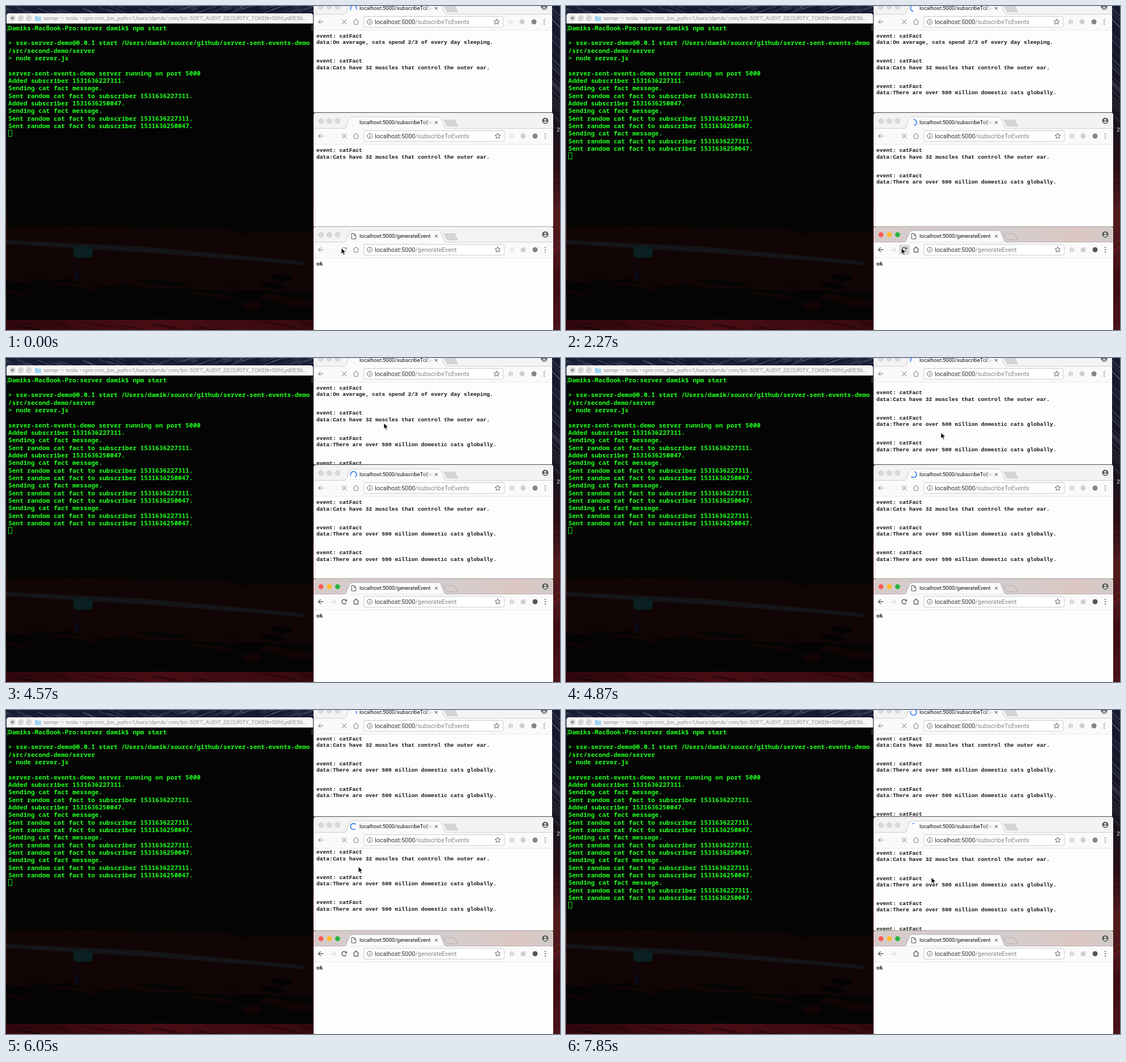
Animation, 978 px wide and 573 px high, one loop 8000 ms. Source, as an HTML page with a canvas:

```html
<!DOCTYPE html>
<html lang="en">
<head>
<meta charset="utf-8">
<title>Server-sent events demo</title>
<style>
  html, body { margin: 0; width: 100%; height: 100%; overflow: hidden; background: #111; }
  canvas { display: block; }
</style>
</head>
<body>
<canvas id="stage" width="978" height="573"></canvas>
<script>
const c = document.getElementById('stage').getContext('2d');
const LOOP = 8000;
const MONO = '600 11.1px "Noto Sans Mono", monospace';
const COURIER = 'bold 9.63px "Liberation Mono", monospace';
const ui = size => `${size}px Roboto, sans-serif`;

const bursts = [[150, 1040, 5], [1210, 2130, 7], [2270, 3180, 7], [3330, 4270, 7],
  [4420, 5460, 8], [5610, 6640, 8], [6820, 7850, 8]];
const ticks = [0, ...bursts.flatMap(([from, to, n]) =>
  Array.from({ length: n }, (_, i) => Math.round(from + (to - from) * i / (n - 1))))];

const ACTIVATED = 300;
const sends = [590, 2720, 7250];
const reloadHidden = [[590, 1210], [2720, 3020], [7250, LOOP]];
const mouse = [[0, 592, 428], [3250, 592, 428], [4270, 659, 150], [4570, 667, 115],
  [4720, 667, 115], [5310, 634, 225], [5460, 632, 233], [5720, 622, 277], [6100, 622, 277],
  [6640, 598, 399], [6850, 598, 430], [7260, 598, 430], [7850, 645, 296]];
const topScroll = [[0, 0], [4570, 0], [5000, 46.8]];
const middleScroll = [[0, 0], [5500, 0], [5800, 4], [6300, 4], [6500, 2.3]];

const globalFact = 'There are over 500 million domestic cats globally.';
const facts = ['On average, cats spend 2/3 of every day sleeping.',
  'Cats have 32 muscles that control the outer ear.', globalFact, globalFact, globalFact];
const subscribers = ['1531636227311', '1531636250047'];
const sentTo = id => `Sent random cat fact to subscriber ${id}.`;
const SENDING = 'Sending cat fact message.';
const sendLog = [SENDING, ...subscribers.map(sentTo)];
const startLog = [
  'Damiks-MacBook-Pro:server damik$ npm start', '',
  '> sse-server-demo@0.0.1 start /Users/damik/source/github/server-sent-events-demo',
  '/src/second-demo/server', '> node server.js', '',
  'server-sent-events-demo server running on port 5000',
  `Added subscriber ${subscribers[0]}.`, SENDING, sentTo(subscribers[0]),
  `Added subscriber ${subscribers[1]}.`, ...sendLog];

const smooth = p => p * p * (3 - 2 * p);

function track(keys, t) {
  const i = keys.findIndex(k => k[0] > t);
  if (i < 0) return keys[keys.length - 1].slice(1);
  const a = keys[i - 1], b = keys[i];
  const p = smooth((t - a[0]) / (b[0] - a[0]));
  return a.slice(1).map((v, j) => v + (b[j + 1] - v) * p);
}

function seeded(seed) {
  return () => (seed = seed * 16807 % 2147483647) / 2147483647;
}

function rect(x, y, w, h, fill) {
  c.fillStyle = fill;
  c.fillRect(x, y, w, h);
}

function text(string, x, y, font, fill) {
  c.font = font;
  c.fillStyle = fill;
  c.fillText(string, x, y);
}

function trace(points, { fill, stroke, width = 1, close = !!fill }) {
  c.beginPath();
  points.forEach(([x, y]) => c.lineTo(x, y));
  if (close) c.closePath();
  if (fill) { c.fillStyle = fill; c.fill(); }
  if (stroke) { c.strokeStyle = stroke; c.lineWidth = width; c.stroke(); }
}

function arc(x, y, r, from, to, stroke, width = 1) {
  c.beginPath();
  c.arc(x, y, r, from, to);
  c.strokeStyle = stroke;
  c.lineWidth = width;
  c.stroke();
}

function disc(x, y, r, fill, stroke) {
  c.beginPath();
  c.arc(x, y, r, 0, 7);
  c.fillStyle = fill;
  c.fill();
  if (stroke) arc(x, y, r, 0, 7, stroke, 0.8);
}

function gradient(x0, y0, x1, y1, ...stops) {
  const g = c.createLinearGradient(x0, y0, x1, y1);
  stops.forEach(([at, colour]) => g.addColorStop(at, colour));
  return g;
}

function box(x, y, w, h, r, fill, stroke) {
  c.beginPath();
  c.roundRect(x, y, w, h, r);
  c.fillStyle = fill;
  c.fill();
  if (stroke) { c.strokeStyle = stroke; c.lineWidth = 1; c.stroke(); }
}

function drawWallpaper() {
  const random = seeded(77);
  rect(0, 0, 978, 573, gradient(0, 0, 0, 573, [0, '#161b30'], [0.35, '#17131f'],
    [0.5, '#2a0f15'], [0.65, '#541a1d'], [0.85, '#3d0d12'], [1, '#48121a']));
  c.lineCap = 'butt';
  for (let i = 0; i < 130; i++) {
    const x = random() * 560 - 10, y = random() * 14, slope = x < 270 ? 0.35 : -0.35;
    const length = 10 + random() * 24;
    trace([[x, y], [x + length, y + length * slope]],
      { stroke: `rgba(165,178,205,${0.1 + random() * 0.4})`, width: 0.8 });
  }
  for (let i = 0; i < 90; i++) {
    const y = random() * 573, sky = y < 200;
    const alpha = 0.1 + random() * 0.4;
    trace([[964, y], [979, y + (sky ? 15 : -7)]],
      { stroke: sky ? `rgba(185,190,205,${alpha})` : `rgba(${y > 300 ? 125 : 45},35,42,${alpha})` });
  }
  rect(0, 555, 543, 18, gradient(0, 0, 543, 0, [0, '#30070d'], [0.5, '#4b0d14'], [1, '#36090f']));
  for (let i = 0; i < 24; i++) {
    const x = random() * 530, y = 556 + random() * 18;
    trace([[x, y], [x + 45, y + 8]], { stroke: 'rgba(15,3,8,.4)', width: 2 });
  }
  text('2', 972.5, 222, ui(9), '#fff');
}

function drawTerminal(log) {
  const random = seeded(19);
  rect(1, 13, 541, 542, '#050404');
  trace([[1, 392], [60, 388], [250, 391], [385, 393], [415, 402], [542, 398],
    [542, 505], [300, 500], [1, 488]], { fill: '#110605' });
  for (let i = 0; i < 26; i++) {
    c.beginPath();
    c.ellipse(20 + random() * 500, 478 + random() * 52, 12 + random() * 40, 3 + random() * 6, 0.1, 0, 7);
    c.fillStyle = i % 2 ? '#050404' : '#100504';
    c.fill();
  }
  trace([[1, 414], [250, 426], [525, 452], [525, 458], [250, 436], [1, 421]], { fill: '#141519' });
  box(119, 425, 34, 20, 6, '#0a2022');
  trace([[123, 470], [131, 467], [127, 485], [121, 482]], { fill: '#0a0a1d' });

  box(1, 13, 541, 18, [4, 4, 0, 0], '#f5f5f5');
  [11.5, 26, 40.5].forEach(x => disc(x, 21.5, 4.3, '#d6d6d6', '#bcbcbc'));
  disc(11.5, 21.5, 1.7, '#666');
  box(51, 18, 5, 3, 1, '#8ecbea');
  box(51, 19, 11, 7.5, 1, '#9bd5f1');
  text('server — node • npm rvm_bin_path=/Users/damik/.rvm/bin SOFT_AUDIT_SECURITY_TOKEN=50ftLyd0E5lt...',
    66, 25, ui(9.8), '#969696');

  const lineY = i => 42.6 + i * 13.33;
  trace([[4, 34.5], [2.5, 34.5], [2.5, 44.5], [4, 44.5]], { stroke: '#158a15' });
  trace([[540.5, 34], [540.5, 44]], { stroke: '#777' });
  log.forEach((line, i) => text(line, 4, lineY(i), MONO, '#1fff1f'));
  c.strokeStyle = '#12d912';
  c.lineWidth = 1;
  c.strokeRect(4.5, Math.round(lineY(log.length) - 10) + 0.5, 6, 11);
}

// An arc that grows at its head, then shrinks at its tail, while turning.
function drawSpinner(x, y, t, startAngle) {
  const half = 666, deg = Math.PI / 180, span = 270;
  const cycle = Math.floor(t / (2 * half)), within = t % (2 * half);
  const base = startAngle + 360 * t / 1568 + span * cycle;
  const growing = within < half, p = smooth(within % half / half);
  const from = growing ? 0 : Math.min(p * span, span - 6);
  const to = growing ? Math.max(p * span, 6) : span;
  arc(x, y, 5.3, (base + from) * deg, (base + to) * deg, '#4285f4', 1.8);
}

function drawArrow(x, y, dir, stroke) {
  trace([[x - 4.5, y], [x + 4.5, y]], { stroke, width: 1.3 });
  trace([[x + dir * 0.5, y - 4], [x + dir * 4.5, y], [x + dir * 0.5, y + 4]], { stroke, width: 1.3 });
}

function drawCross(x, y, r, stroke, width) {
  trace([[x - r, y - r], [x + r, y + r]], { stroke, width });
  trace([[x - r, y + r], [x + r, y - r]], { stroke, width });
}

function drawReload(x, y, colour) {
  arc(x, y, 4, 0.5, 5.4, colour, 1.4);
  trace([[x + 5, y - 5], [x + 5, y - 0.7], [x + 0.7, y - 0.7]], { fill: colour });
}

function drawStar(x, y, stroke) {
  const points = Array.from({ length: 10 }, (_, i) => {
    const a = i * Math.PI / 5 - Math.PI / 2, r = i % 2 ? 2.3 : 5.3;
    return [x + r * Math.cos(a), y + r * Math.sin(a)];
  });
  trace(points, { stroke, close: true });
}

function drawTabStrip(w) {
  const { top, right, active, path } = w, mid = top + 17;
  const lights = active ? ['#fc5b57', '#fdbc2e', '#28b83f'] : Array(3).fill('#dadada');
  box(543, top, right - 543, 28, [4, 4, 0, 0], active
    ? gradient(543, 0, right, 0, [0, '#d7cbca'], [0.55, '#d3cdcd'], [0.85, '#dcc7c3'], [1, '#d4caca'])
    : '#f3f3f3');
  lights.forEach((fill, i) => disc(556 + i * 14.7, top + 14.5, 4.4, fill, active ? null : '#c8c8c8'));
  trace([[543, top + 27.5], [597, top + 27.5], [600, top + 26], [607, top + 9], [610, top + 7],
    [764, top + 7], [767, top + 9], [774, top + 26], [777, top + 27.5], [right, top + 27.5]],
    { fill: '#fbfbfb', stroke: active ? '#b9afaf' : '#cfcfcf', close: false });
  trace([[773, top + 12.5], [792, top + 12.5], [797, top + 23.5], [779, top + 23.5]],
    { fill: active ? '#d6cecd' : '#d5d5d5', stroke: active ? '#b5abab' : '#cacaca', close: true });
  if (w.spin) drawSpinner(613.5, mid, ...w.spin);
  else {
    trace([[610, mid - 4.5], [614.5, mid - 4.5], [617.5, mid - 1.5], [617.5, mid + 5], [610, mid + 5]],
      { stroke: '#555', close: true });
    trace([[614.5, mid - 4.5], [614.5, mid - 1.5], [617.5, mid - 1.5]], { stroke: '#555' });
  }
  const ink = w.spin ? gradient(736, 0, 754, 0, [0, '#111'], [1, 'rgba(17,17,17,0)']) : '#111';
  text('localhost:5000' + path, 624, mid + 3.4, ui(9.43), ink);
  drawCross(759.5, mid, 2.3, '#666', 1.1);
  const userX = right - 14;
  disc(userX, top + 14, 5.6, '#5d5d5d');
  disc(userX, top + 12.2, 1.8, '#eee');
  box(userX - 3.2, top + 15.2, 6.4, 2.4, 1.2, '#eee');
}

function drawToolbar(w) {
  const { top, right, active, path } = w, y = top + 41;
  const icon = active ? '#555' : '#a0a0a0';
  rect(543, top + 28, right - 543, 27, '#fafafa');
  drawArrow(556, y, -1, icon);
  if (active) drawArrow(577, y, 1, '#d4d4d4');
  if (w.hover) box(588, y - 9, 18.5, 18, 2, '#dadada');
  if (w.spin) drawCross(597, y, 4, icon, 1.3);
  else if (w.reload) drawReload(597, y, icon);
  trace([[613, y], [618, y - 4.8], [623, y]], { stroke: icon, width: 1.2 });
  trace([[614.5, y - 0.5], [614.5, y + 4.3], [621.5, y + 4.3], [621.5, y - 0.5]], { stroke: icon, width: 1.2 });

  const edge = right - 86.5;
  box(631.5, y - 9.5, edge - 631.5, 19, 2.5, '#fff', '#cbcbcb');
  arc(642, y, 4.5, 0, 7, '#666');
  rect(641.5, y - 0.8, 1.2, 3.3, '#666');
  rect(641.5, y - 2.7, 1.2, 1.2, '#666');
  text('localhost:5000', 651, y + 3.9, ui(10.85), '#333');
  text(path, 651 + c.measureText('localhost:5000').width, y + 3.9, ui(10.85), '#858585');
  drawStar(right - 98, y, '#666');
  disc(right - 73, y, 4.5, w.dimBadge ? '#ececec' : '#dadada');
  disc(right - 53, y, 4.5, '#cfcfcf');
  disc(right - 32, y, 4.5, active ? '#555' : '#858585');
  [-4, 0, 4].forEach(d => disc(right - 14, y + d, 1.1, active ? '#555' : '#777'));
}

function drawBrowser(w) {
  const { top, right, bottom } = w;
  drawTabStrip(w);
  drawToolbar(w);
  c.save();
  c.beginPath();
  c.rect(543, top + 55, right - 543, bottom - top - 55);
  c.clip();
  rect(543, top + 55, right - 543, bottom - top, '#fdfdfd');
  rect(543, top + 54.5, right - 543, 1, '#d6d6d6');
  const firstY = top + 69.4 - (w.scroll || 0);
  if (w.facts) w.facts.forEach((fact, i) => {
    const y = firstY + i * 44.5;
    text('event: catFact', 548, y, COURIER, '#111');
    text('data:' + fact, 548, y + 11.2, COURIER, '#111');
  });
  else text('ok', 548, firstY, COURIER, '#111');
  c.restore();
}

function drawMouse([x, y]) {
  const shape = [[0, 0], [0, 10.6], [2.5, 8.3], [4.3, 12.4], [6.1, 11.6], [4.4, 7.7], [7.8, 7.5]];
  trace(shape.map(([dx, dy]) => [x + dx, y + dy]), { fill: '#000', stroke: '#fff', width: 0.9 });
}

function draw(now) {
  const time = now % LOOP;
  const t = ticks.filter(tick => tick <= time).pop();
  const sent = sends.filter(at => t >= at).length;
  const pointer = track(mouse, t);
  const active = t >= ACTIVATED;
  const reload = !reloadHidden.some(([from, to]) => t >= from && t < to);
  const over = Math.abs(pointer[0] - 597) < 10 && Math.abs(pointer[1] - 431) < 10;
  const shared = { dimBadge: !active };

  drawWallpaper();
  drawTerminal([...startLog, ...Array(sent).fill(sendLog).flat()]);
  drawBrowser({ ...shared, top: -13, right: 964, bottom: 188, path: '/subscribeToEvents',
    spin: [t + 800, -70], facts: facts.slice(0, 2 + sent), scroll: 0.6 + track(topScroll, t)[0] });
  rect(543, 188, 423, 1, '#4a4a50');
  drawBrowser({ ...shared, top: 189, right: 966, bottom: 390, path: '/subscribeToEvents',
    spin: [t, 100], facts: facts.slice(1, 2 + sent), scroll: track(middleScroll, t)[0] });
  drawBrowser({ ...shared, top: 390, right: 966, bottom: 573, path: '/generateEvent',
    active, reload, hover: active && reload && over });
  rect(543, 389.5, 423, 1, '#a5a0a0');
  drawMouse(pointer);
}

const start = performance.now();
(function loop() {
  draw(performance.now() - start);
  requestAnimationFrame(loop);
})();
</script>
</body>
</html>
```
